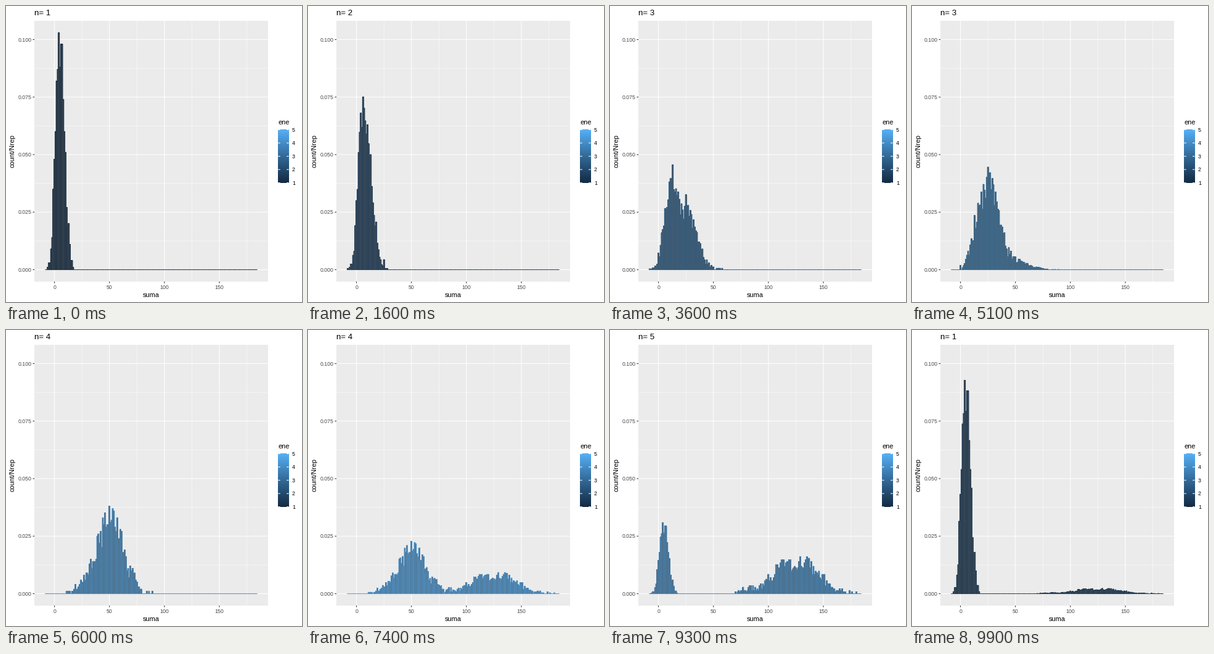
Animation of 480x480 px, one loop 10000 ms. Source, as a matplotlib script:

```python
import numpy as np
import matplotlib.pyplot as plt
from matplotlib.animation import FuncAnimation
from matplotlib.collections import LineCollection, PolyCollection
from matplotlib.patches import Rectangle

SIZE, DPI = 480, 100
PT = 72 / DPI  # points per pixel
LINE = 1.067
plt.rcParams["font.family"] = "Liberation Sans"

BINS = np.arange(-8, 185)
BLOCK = 5  # bins per envelope point

# Narrow histograms: first bin and counts
NARROW_1 = -6, [1, 3, 3, 9, 14, 35, 48, 60, 82, 87, 103, 88, 98, 98, 74, 60,
                51, 27, 19, 20, 11, 4, 4, 1]
NARROW_2 = -8, [1, 0, 1, 2, 2, 4, 3, 6, 15, 14, 25, 37, 39, 40, 56, 47, 57,
                58, 73, 78, 75, 75, 57, 50, 40, 34, 38, 21, 16, 10, 8, 4, 3,
                8, 1, 1, 1]
# Wide histograms: first bin and mean count per block of bins
WIDE_3 = 0, [1.4, 6.4, 18.4, 29.4, 39.8, 44, 31.4, 17.8, 7.6, 2.6, 1, 0.4]
WIDE_4 = 10, [0.4, 1.4, 3.4, 5.2, 11.6, 16.8, 24.4, 32.2, 31.6, 29.2, 20.4,
              10.8, 8.8, 2.6, 0.8, 0.4]
WIDE_5 = 70, [0.6, 2, 3, 2.8, 3.8, 7.6, 10.4, 14.2, 17.6, 18, 20, 19.4, 17.2,
              19.4, 11.8, 14, 8.2, 4, 1.6, 1.6, 1, 0.8, 0.4]

# Panel edges in pixels and the data ranges they span
LEFT, RIGHT, TOP, BOTTOM = 46.2, 424.75, 24.0, 446.8
X0, X1 = -18.15, 194.15
Y0, Y1 = -0.00515, 0.10815

# Hold and transition times (in steps) of the state position
KEY_STEPS = [0, 10, 21, 30, 40, 50, 60, 70, 80, 90, 100]
KEY_STATES = [0, 0, 1, 1, 2, 2, 3, 3, 4, 4, 5]

WHITE_POINT = np.array([0.95047, 1.0, 1.08883])
TO_XYZ = np.array([[0.4124564, 0.3575761, 0.1804375],
                   [0.2126729, 0.7151522, 0.0721750],
                   [0.0193339, 0.1191920, 0.9503041]])


def narrow(first, counts):
    freq = np.zeros(len(BINS))
    start = first - BINS[0]
    freq[start:start + len(counts)] = counts
    return freq / 1000


def wide(first, means, seed):
    """Sampling noise around a piecewise linear envelope."""
    rng = np.random.default_rng(seed)
    centres = first + BLOCK // 2 + BLOCK * np.arange(len(means))
    mean = np.interp(BINS, centres, means)
    inside = (BINS >= first) & (BINS < first + BLOCK * len(means))
    noise = np.sqrt(mean) * rng.uniform(-1.2, 1.2, len(BINS))
    return np.maximum(np.round(mean + noise), 0) * inside / 1000


FREQ = np.array([narrow(*NARROW_1), narrow(*NARROW_2), wide(*WIDE_3, 3),
                 wide(*WIDE_4, 4), wide(*WIDE_5, 5)])


def px(x):
    return LEFT + (x - X0) / (X1 - X0) * (RIGHT - LEFT)


def py(y):
    return BOTTOM - (y - Y0) / (Y1 - Y0) * (BOTTOM - TOP)


def to_lab(rgb):
    c = np.array(rgb) / 255
    c = np.where(c > 0.04045, ((c + 0.055) / 1.055) ** 2.4, c / 12.92)
    t = TO_XYZ @ c / WHITE_POINT
    f = np.where(t > 0.008856, np.cbrt(t), 7.787 * t + 16 / 116)
    return np.array([116 * f[1] - 16, 500 * (f[0] - f[1]), 200 * (f[1] - f[2])])


def to_rgb(lab):
    fy = (lab[0] + 16) / 116
    f = np.array([fy + lab[1] / 500, fy, fy - lab[2] / 200])
    t = np.where(f > 0.20689, f ** 3, (f - 16 / 116) / 7.787)
    c = np.clip(np.linalg.solve(TO_XYZ, t * WHITE_POINT), 0, 1)
    c = np.where(c > 0.0031308, 1.055 * c ** (1 / 2.4) - 0.055, 12.92 * c)
    return np.clip(c, 0, 1)


DARK, LIGHT = to_lab((0x13, 0x2B, 0x43)), to_lab((0x56, 0xB1, 0xF7))


def shade(t):
    return to_rgb(DARK + (LIGHT - DARK) * t)


fig = plt.figure(figsize=(SIZE / DPI, SIZE / DPI), dpi=DPI, facecolor="white")
ax = fig.add_axes([0, 0, 1, 1])


def lines(segments, color, width=LINE, z=1):
    art = LineCollection(segments, colors=color, linewidths=width * PT,
                         capstyle="butt", zorder=z)
    art.set_snap(False)
    ax.add_collection(art, autolim=False)


def label(x, y, text, size, color="black", **kw):
    return ax.text(x, y, text, fontsize=size * PT, color=color,
                   va="baseline", zorder=5, **kw)


def vertical(x):
    return [(px(x), TOP), (px(x), BOTTOM)]


def horizontal(y):
    return [(LEFT, py(y)), (RIGHT, py(y))]


def draw_panel():
    ax.add_patch(Rectangle((LEFT, TOP), RIGHT - LEFT, BOTTOM - TOP,
                           fc="#EBEBEB", ec="none", lw=0, zorder=0))
    x_ticks = np.arange(4) * 50
    y_ticks = np.arange(5) * 0.025
    minor = [vertical(x + 25) for x in x_ticks]
    minor += [horizontal(y + 0.0125) for y in y_ticks[:-1]]
    lines(minor, "white", LINE / 2)
    lines([vertical(x) for x in x_ticks] + [horizontal(y) for y in y_ticks],
          "white")
    lines([[(px(x), BOTTOM), (px(x), BOTTOM + 2.74)] for x in x_ticks]
          + [[(LEFT - 2.74, py(y)), (LEFT, py(y))] for y in y_ticks],
          "#333333")
    for x in x_ticks:
        label(px(x), 458.75, str(x), 8.8, "#4D4D4D", ha="center")
    for y in y_ticks:
        label(41.2, py(y) + 3.2, f"{y:.3f}", 8.8, "#4D4D4D", ha="right")
    label((LEFT + RIGHT) / 2, 471.5, "suma", 11, ha="center")
    label(13.5, (TOP + BOTTOM) / 2, "count/Nrep", 11, ha="center",
          rotation=90, rotation_mode="anchor")


def draw_legend():
    left, right, top, bottom = 441.2, 458.5, 200.45, 286.85
    ramp = np.array([[shade(t)] for t in np.linspace(1, 0, 300)])
    ax.imshow(ramp, extent=(left, right, bottom, top), aspect="auto",
              interpolation="bilinear", zorder=1)
    label(left, 192, "ene", 11)
    tick = (right - left) / 5
    for n in range(1, 6):
        y = np.interp(n, [1, 5], [bottom - 0.15, top + 0.15])
        lines([[(left, y), (left + tick, y)], [(right - tick, y), (right, y)]],
              "white", z=2)
        label(464, y + 3.2, str(n), 8.8)


draw_panel()
draw_legend()
title = label(LEFT, 15.3, "", 13.2)

# Each bar is a hard-edged fill followed by its smooth outline
bars = PolyCollection([], facecolors=["#595959", "none"],
                      linewidths=[0, LINE * PT], antialiaseds=[False, True],
                      joinstyle="miter", zorder=3)
bars.set_snap(False)
ax.add_collection(bars, autolim=False)
ax.set(xlim=(0, SIZE), ylim=(SIZE, 0))
ax.axis("off")


def update(step):
    pos = np.interp(step, KEY_STEPS, KEY_STATES)
    i = int(pos)
    t = pos - i
    j = (i + 1) % len(FREQ)
    heights = (1 - t) * FREQ[i] + t * FREQ[j]
    level = ((1 - t) * i + t * j) / 4

    x0, x1 = px(BINS - 0.5), px(BINS + 0.5)
    base, tip = np.full(len(BINS), py(0)), py(heights)
    rects = np.stack([np.stack([x0, x1, x1, x0], 1),
                      np.stack([base, base, tip, tip], 1)], 2)
    bars.set_verts(np.repeat(rects, 2, axis=0))
    bars.set_edgecolor(["none", tuple(shade(level))])
    title.set_text(f"n= {(j if t > 0.499 else i) + 1}")
    return bars, title


anim = FuncAnimation(fig, update, frames=100, interval=100, repeat=True,
                     repeat_delay=0, blit=False)
plt.show()
```
